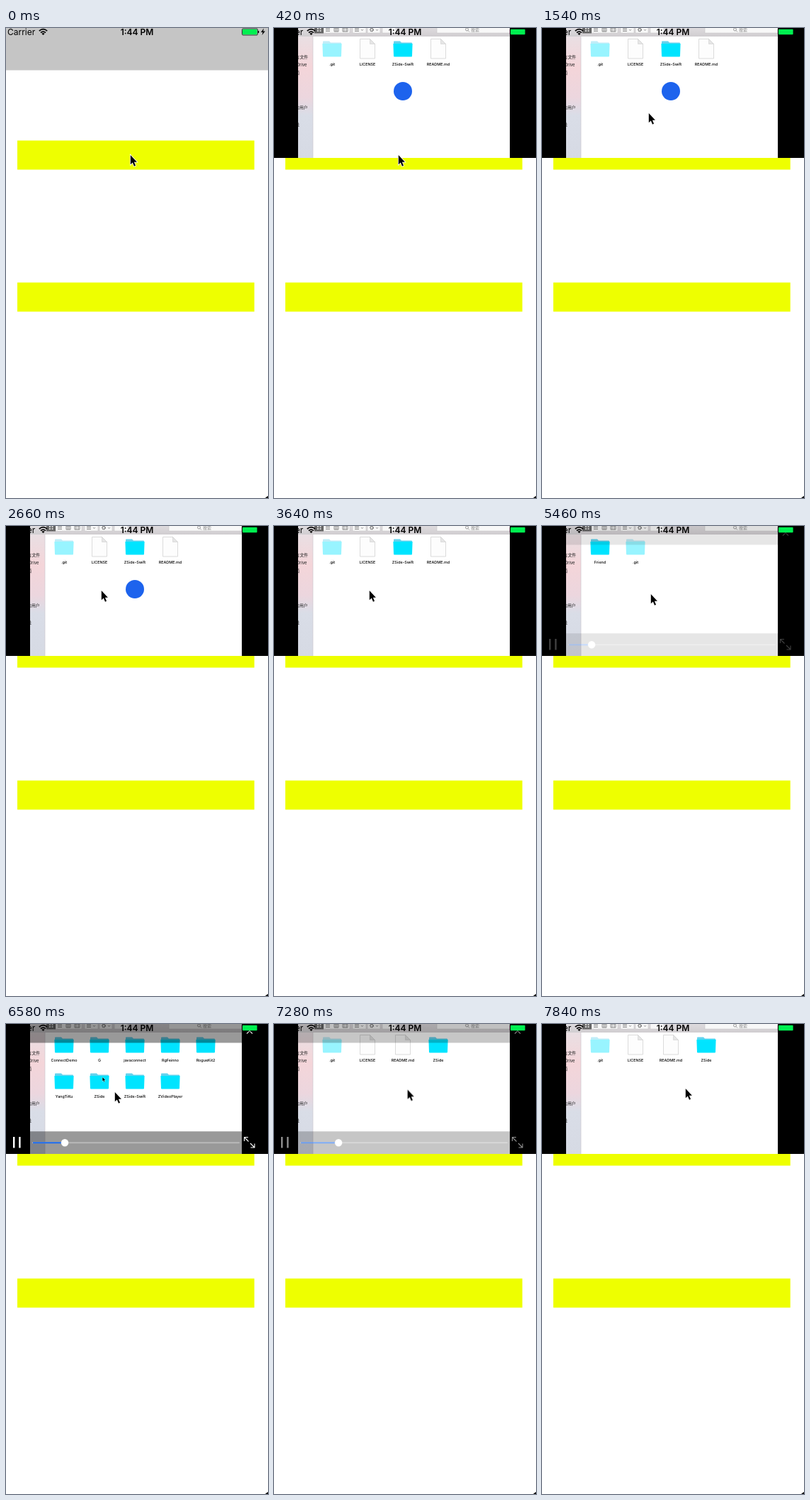
Write an HTML page that moves like this. It is 370 px wide and 662 px high and loops after 8000 ms.

```html
<!DOCTYPE html>
<html lang="en">
<head>
<meta charset="utf-8">
<title>Video player demo</title>
<style>
html, body { margin: 0; width: 100%; height: 100%; overflow: hidden; background: #fff; }
svg { display: block; width: 370px; height: 662px; }
text { font-family: Inter, "Noto Sans CJK SC", "Noto Sans CJK", sans-serif; }
.label { font-size: 5.4px; font-weight: 500; text-anchor: middle; }
.side { font-size: 5.8px; text-anchor: end; fill: #222; }
.anim { animation: 8s linear infinite; }
.cut { animation: 8s step-end infinite; visibility: hidden; }

#player { animation-name: player; }
#video { animation-name: video; }
#loading { animation-name: loading; }
#swift { animation-name: swift; }
#parent { animation-name: parent; }
#selectG { animation-name: selectG; }
#unselectedG { animation-name: unselectedG; }
#friend { animation-name: friend; }
#zside { animation-name: zside; }
#pointA { animation-name: pointA; }
#pointB { animation-name: pointB; }
#controls { animation-name: controls; }
#knob { animation-name: knob; }
#played { animation-name: played; }
#cursor { animation-name: cursor; animation-timing-function: ease-in-out; }

@keyframes player { 0% { visibility: hidden } 1.75%, 100% { visibility: visible } }
@keyframes video { 0% { visibility: hidden } 3.5%, 100% { visibility: visible } }
@keyframes loading { 0%, 36.75%, 100% { visibility: hidden } 5.25% { visibility: visible } }
@keyframes swift { 0%, 50.75%, 100% { visibility: hidden } 3.5% { visibility: visible } }
@keyframes parent { 0%, 61.25%, 85.75%, 100% { visibility: hidden } 50.75%, 73.5% { visibility: visible } }
@keyframes selectG { 0%, 61.25%, 100% { visibility: hidden } 57.75% { visibility: visible } }
@keyframes unselectedG { 0%, 57.75%, 85.75%, 100% { visibility: hidden } 50.75%, 73.5% { visibility: visible } }
@keyframes friend { 0%, 73.5%, 100% { visibility: hidden } 61.25% { visibility: visible } }
@keyframes zside { 0% { visibility: hidden } 85.75%, 100% { visibility: visible } }
@keyframes pointA { 0%, 61.25%, 100% { visibility: hidden } 50.75% { visibility: visible } }
@keyframes pointB { 0%, 85.75%, 100% { visibility: hidden } 73.5% { visibility: visible } }
@keyframes controls {
  0%, 47.25%, 70.25%, 73.5%, 95.5%, 100% { opacity: 0 }
  50%, 62.25%, 76%, 87.5% { opacity: 1 }
}
@keyframes knob { 0%, 33.5% { transform: translateX(38px) } 100% { transform: translateX(99.4px) } }
@keyframes played { 0%, 33.5% { transform: scaleX(0) } 100% { transform: scaleX(61.4) } }
@keyframes cursor {
  0%, 8.75% { transform: translate(175px, 178px) }
  17.5%, 22.75% { transform: translate(150px, 119px) }
  33.25%, 61% { transform: translate(134px, 90px) }
  67%, 86% { transform: translate(153px, 95px) }
  94%, 100% { transform: translate(202px, 90px) }
}
</style>
</head>
<body>
<svg viewBox="0 0 370 662">
  <defs>
    <linearGradient id="sidebar" x2="0" y2="1">
      <stop offset="0" stop-color="#e9dfe3"/>
      <stop offset=".25" stop-color="#f4d5d9"/>
      <stop offset=".5" stop-color="#ecd6de"/>
      <stop offset=".65" stop-color="#d9dde7"/>
      <stop offset="1" stop-color="#d6dae4"/>
    </linearGradient>
    <linearGradient id="toolbar" x2="0" y2="1">
      <stop offset="0" stop-color="#dedbde"/>
      <stop offset="1" stop-color="#d0cdd0"/>
    </linearGradient>
    <clipPath id="screen"><path d="M34 0H333V183H34z"/></clipPath>
    <g id="folder">
      <path d="M-13-10q0-1 1-1h8l2 2h14q1 0 1 1v4h-26z" fill="#62d3ee"/>
      <path d="M-13.600-7.500h27.200l-.6 17.600q0 1-1 1h-24q-1 0-1-1z" fill="#00e4ff"/>
    </g>
    <g id="file">
      <path d="M-10.500-14h14l7 7v20.500h-21z" fill="#fdfdfd" stroke="#d2d2d2" stroke-width=".8"/>
      <path d="M3.500-14v7h7z" fill="#e6e6e6" stroke="#cfcfcf" stroke-width=".6"/>
    </g>
    <path id="arrow" d="M.8 1V14.300L3.800 11.600L6 16.700L8 15.800L5.900 10.800H9.900z" fill="#000" stroke="#fff" stroke-width="1.600" paint-order="stroke"/>
  </defs>

  <rect width="370" height="662" fill="#fff"/>
  <rect width="370" height="59.500" fill="#c5c5c5"/>
  <path d="M16 158.500H350.700V199.500H16zM16 358.500H350.700V399.500H16z" fill="#eeff00"/>
  <path d="M370 659V662H366z"/>

  <g id="player" class="cut">
    <rect width="370" height="183"/>
    <g id="video" class="cut" clip-path="url(#screen)">
      <rect x="34" width="299" height="183" fill="#fff"/>
      <rect x="34" y="12" width="21" height="171" fill="url(#sidebar)"/>
      <path d="M55 12V183" stroke="#cfcbd0" stroke-width=".7"/>
      <rect x="34" width="299" height="12" fill="url(#toolbar)"/>
      <path d="M70-3H107V7H70zM111-3H130V7H111zM132-3H150V7H132zM153-3H172V7H153zM230-3H333V7H230z" fill="#f8f8f8" stroke="#c2c0c2" stroke-width=".5"/>
      <rect x="57" y="-3" width="13" height="10.500" fill="#666"/>
      <path d="M61 1h2m1.500 0h2M61 4h2m1.500 0h2" stroke="#fff" stroke-width="1.600"/>
      <path d="M73 .5h6m-6 2h6m-6 2h6M85 0h6v5h-6zM87 0v5M89 0v5M97 0h7v5h-7zM99 0v5M102 0v5M114 .5h6m-6 2h6m-6 2h6M123 2l1.500 1.500L126 2M144 2l1.500 1.500L147 2" fill="none" stroke="#777" stroke-width=".8"/>
      <circle cx="138" cy="2.500" r="2" fill="none" stroke="#666" stroke-width="1.600" stroke-dasharray="1.200 .5"/>
      <g fill="none" stroke="#777" stroke-width=".7"><circle cx="272.500" cy="2" r="2"/><path d="M274 3.500l2 2"/></g>
      <text x="278" y="5" font-size="6" fill="#888">搜索</text>
      <g class="side">
        <text x="48" y="42.500">言文件</text>
        <text x="46.500" y="54">Drive</text>
        <text x="36" y="65">桌面</text>
        <text x="47.500" y="113.500">的用户</text>
        <text x="36" y="138">磁盘</text>
      </g>

      <g id="swift" class="cut"></g>
      <g id="parent" class="cut"></g>
      <g id="unselectedG" class="cut"><use href="#folder" x="132" y="29.500"/><text class="label" x="132" y="52.500">G</text></g>
      <g id="selectG" class="cut">
        <rect x="116" y="13" width="32.500" height="33" rx="2" fill="#d6d6d6"/>
        <use href="#folder" x="132" y="29.500"/>
        <rect x="128" y="47" width="7.500" height="7.500" rx="1" fill="#1461e0"/>
        <text class="label" x="131.800" y="52.500" fill="#fff">G</text>
      </g>
      <g id="friend" class="cut"></g>
      <g id="zside" class="cut"></g>
      <g id="pointA" class="cut"><use href="#arrow" transform="translate(134.500 30) scale(.42)"/></g>
      <g id="pointB" class="cut"><use href="#arrow" transform="translate(136 74.500) scale(.42)"/></g>
    </g>
    <circle id="loading" class="cut" cx="182" cy="89" r="13" fill="#1d63ed"/>

    <g id="controls" class="anim">
      <path d="M0 0H370V26.600H0zM0 151.300H370V183H0z" fill-opacity=".4"/>
      <path d="M38 167.300H329" stroke="#b9b9b9" stroke-width="2" stroke-linecap="round"/>
      <g transform="translate(38 166.300)"><rect id="played" class="anim" width="1" height="2" fill="#1769ef"/></g>
      <circle id="knob" class="anim" cy="167.300" r="5.200" fill="#fff"/>
      <path d="M11.200 159V174.500M19.400 159V174.500" stroke="#fff" stroke-width="2.400"/>
      <path d="M336.500 165V159.500H342M336.500 159.500L342.500 165.500M351 168.500V174H345.500M351 174L345 168M340 5.600L348 13.600M348 5.600L340 13.600" fill="none" stroke="#fff" stroke-width="1.100"/>
    </g>
  </g>

  <g id="status">
    <text x="2" y="10" font-size="12">Carrier</text>
    <g fill="none" stroke="#000" stroke-width="1.700">
      <path d="M46.800 4.200Q52.500-.8 58.200 4.200M49 6.500Q52.500 3.600 56 6.500"/>
    </g>
    <path d="M50.400 7.900Q52.500 6.300 54.600 7.900L52.500 10z"/>
    <text x="185" y="10" font-size="12" font-weight="600" text-anchor="middle">1:44 PM</text>
    <rect x="333.400" y="1" width="22" height="9" rx="1.500" fill="none" stroke="#000" stroke-width=".8"/>
    <rect x="334" y="1.700" width="20.600" height="7.600" rx="1" fill="#00f050"/>
    <path d="M356 4h1.200v3H356zM364 .5L360 6H362.600L361.500 10L366 4.400H363.200z"/>
  </g>
  <g id="cursor" class="anim"><use href="#arrow"/></g>
</svg>
<script>
const listings = {
  swift: ['.git', 'LICENSE', 'ZSide-Swift', 'README.md'],
  parent: ['ConnectDemo', '', 'javaconnect', 'RgFeinno', 'RogueKit2', 'YangTiKu', 'ZSide', 'ZSide-Swift', 'ZVideoPlayer'],
  friend: ['Friend', '.git'],
  zside: ['.git', 'LICENSE', 'README.md', 'ZSide']
};

// Icons flow left to right, five to a row; an empty name leaves a gap.
function item(name, i) {
  if (!name) return '';
  const x = 82 + 50 * (i % 5), y = 29.5 + 51 * Math.floor(i / 5);
  const kind = /^(LICENSE|README)/.test(name) ? 'file' : 'folder';
  const opacity = name[0] === '.' ? 0.4 : 1;
  return `<use href="#${kind}" x="${x}" y="${y}" opacity="${opacity}"/>` +
    `<text class="label" x="${x}" y="${y + 23}">${name}</text>`;
}

for (const [id, names] of Object.entries(listings)) {
  document.getElementById(id).innerHTML = names.map(item).join('');
}
</script>
</body>
</html>
```
